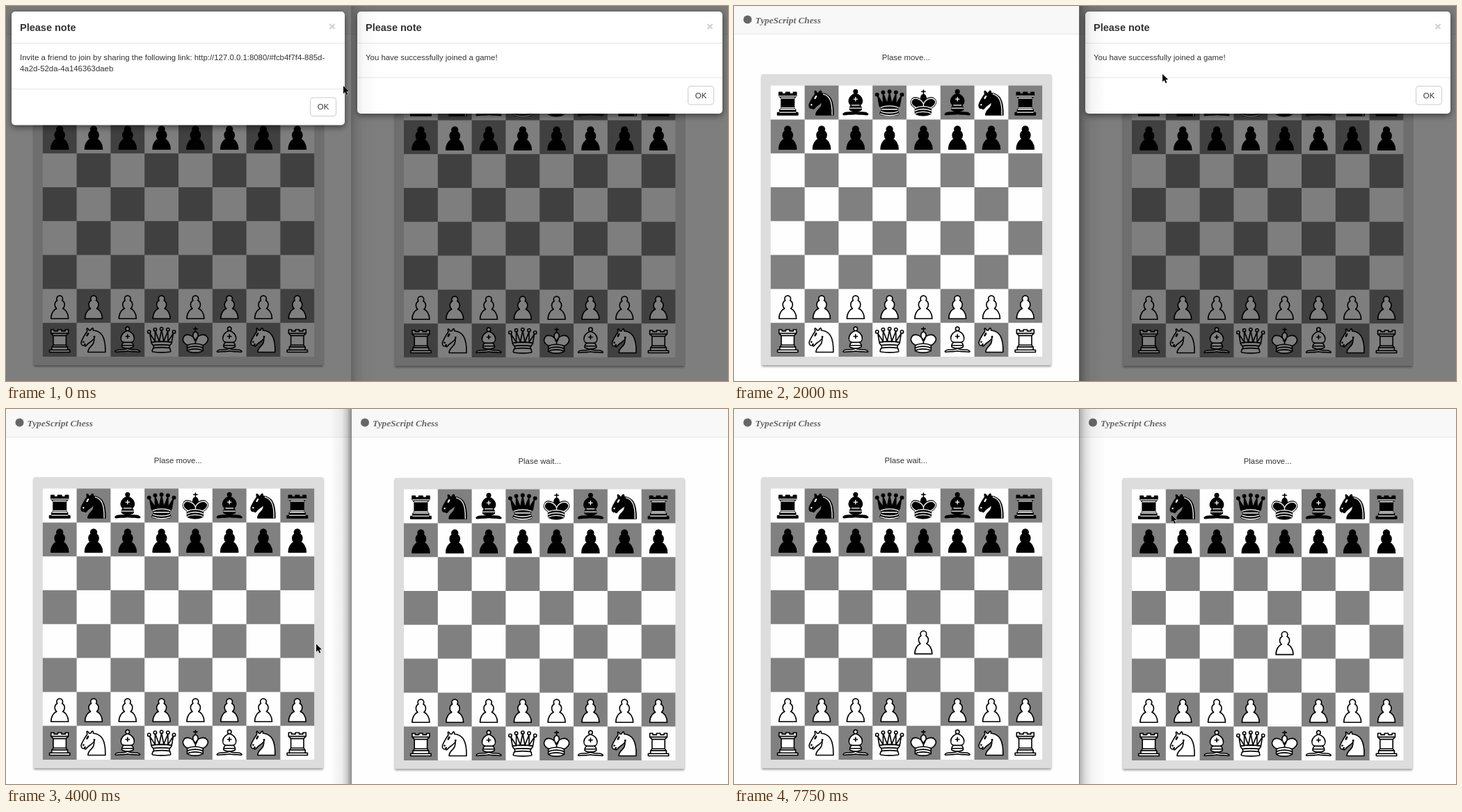
These frames come from a looping animation (1038x540 px, 8 s). An HTML page:

```html
<!DOCTYPE html>
<html lang="en">
<head>
<meta charset="utf-8">
<title>Chess</title>
<style>
html, body { margin: 0; width: 100%; height: 100%; overflow: hidden; background: #fefefe; }
svg { display: block; width: 1038px; height: 540px; font: 11.4px "Liberation Sans", Arial, sans-serif; }
text { fill: #333; }
.title { font-size: 14.5px; font-weight: bold; }
.brand { font: italic bold 13.3px "Liberation Serif", serif; fill: #666; }
.close { font-size: 17px; font-weight: bold; fill: #ccc; }
.piece { stroke-width: 1.5; stroke-linecap: round; stroke-linejoin: round; }
.frame { filter: drop-shadow(0 2px 1.5px rgba(0, 0, 0, .4)); }
.modal { filter: drop-shadow(0 3px 5px rgba(0, 0, 0, .5)); }
</style>
</head>
<body>
<svg id="stage" viewBox="0 0 1038 540"></svg>
<script>
const CELL = 48.8, STEP = 250, STEPS = 32;
const stage = document.getElementById('stage');
const get = id => document.getElementById(id);

const dots = [[6, 12], [14, 9], [22.5, 8], [31, 9], [39, 12]]
  .map(([x, y]) => `M${x - 2} ${y}a2 2 0 1 1 4 0 2 2 0 1 1-4 0z`).join('');
const kingBands = 'M11.5 30c5.5-3 15.5-3 21 0m-21 3.5c5.5-3 15.5-3 21 0m-21 3.5c5.5-3 15.5-3 21 0';
const mitre = 'M17.5 26h10M15 30h15m-7.5-14.5v5M20 18h5';
const eyes = 'M9.5 25.5a.5.5 0 1 1-1 0 .5.5 0 1 1 1 0zM14.9 15.8a.5 1.5 30 1 1-.8-.5.5 1.5 30 1 1 .8.5z';

// body, details on white pieces, details on black pieces
const pieces = {
  p: ['M22.5 9c-2.21 0-4 1.79-4 4 0 .89.29 1.71.78 2.38C17.33 16.5 16 18.59 16 21c0 2.03.94 3.84 2.41 5.03-3 1.06-7.41 5.55-7.41 13.47h23c0-7.92-4.41-12.41-7.41-13.47 1.47-1.19 2.41-3 2.41-5.03 0-2.41-1.33-4.5-3.28-5.62.49-.67.78-1.49.78-2.38 0-2.21-1.79-4-4-4z', '', ''],
  r: ['M9 39h27v-3H9zM12 36v-4h21v4zM11 14V9h4v2h5V9h5v2h5V9h4v5zM34 14l-3 3H14l-3-3M31 17v12.5H14V17M31 29.5l1.5 2.5h-20l1.5-2.5z', '',
    'M12 35.5h21M13 31.5h19M14 29.5h17M14 16.5h17M11 14h23'],
  n: ['M22 10c10.5 1 16.5 8 16 29H15c0-9 10-6.5 8-21M24 18c.38 2.91-5.55 7.37-8 9-3 2-2.82 4.34-5 4-1.04-.94 1.41-3.04 0-3-1 0 .19 1.23-1 2-1 0-4 1-4-4 0-2 6-12 6-12s1.89-1.9 2-3.5c-.73-1-.5-2-.5-3 1-1 3 2.5 3 2.5h2s.78-2 2.5-3c1 0 1 3 1 3',
    eyes, eyes + 'M24.6 11.3c8 1.8 12.2 9 11.8 27.6'],
  b: ['M9 36c3.39-.97 10.11.43 13.5-2 3.39 2.43 10.11 1.03 13.5 2 0 0 1.65.54 3 2-.68.97-1.65.99-3 .5-3.39-.97-10.11.46-13.5-1-3.39 1.46-10.11.03-13.5 1-1.35.49-2.32.47-3-.5 1.35-1.94 3-2 3-2zM15 32c2.5 2.5 12.5 2.5 15 0 .5-1.5 0-2 0-2 0-2.5-2.5-4-2.5-4 5.5-1.5 6-11.5-5-15.5-11 4-10.5 14-5 15.5 0 0-2.5 1.5-2.5 4 0 0-.5.5 0 2zM25 8a2.5 2.5 0 1 1-5 0 2.5 2.5 0 1 1 5 0z', mitre, mitre],
  q: [dots + 'M9 26c8.5-1.5 21-1.5 27 0l2-12-7 11V11l-5.5 13.5-3-15-3 15-5.5-14V25L7 14zM9 26c0 2 1.5 2 2.5 4 1 1.5 1 1 .5 3.5-1.5 1-1.5 2.5-1.5 2.5-1.5 1.5.5 2.5.5 2.5 6.5 1 16.5 1 23 0 0 0 1.5-1 0-2.5 0 0 .5-1.5-1-2.5-.5-2.5-.5-2 .5-3.5 1-2 2.5-2 2.5-4-8.5-1.5-18.5-1.5-27 0z',
    'M11.5 30c3.5-1 18.5-1 22 0M12 33.5c6-1 15-1 21 0',
    'M11 29a35 35 0 0 1 23 0M12.5 31.5h20M11.5 34.5a35 35 0 0 0 22 0M10.5 37.5a35 35 0 0 0 24 0'],
  k: ['M22.5 11.63V6M20 8h5M22.5 25s4.5-7.5 3-10.5c0 0-1-2.5-3-2.5s-3 2.5-3 2.5c-1.5 3 3 10.5 3 10.5M11.5 37c5.5 3.5 15.5 3.5 21 0v-7s9-4.5 6-10.5c-4-6.5-13.5-3.5-16 4V27v-3.5c-3.5-7.5-13-10.5-16-4-3 6 5 10 5 10z', kingBands,
    kingBands + 'M32 29.5s8.5-4 6-9.65C34.15 14 25 18 22.5 24.5v2.1-2.1C20 18 9.9 14 7 19.85c-2.5 5.65 4.85 9 4.85 9']
};

const rect = (x, y, w, h, more) => `<rect x="${x}" y="${y}" width="${w}" height="${h}" ${more}/>`;
const text = (x, y, str, more = '') => `<text x="${x}" y="${y}" ${more}>${str}</text>`;

function piece(kind, black, x, y, id) {
  const [body, light, dark] = pieces[kind];
  return `<g ${id ? `id="${id}"` : ''} class="piece" transform="translate(${x} ${y}) scale(${CELL / 45})">
    <path d="${body}" fill="${black ? '#000' : '#fff'}" stroke="#000"/>
    <path d="${black ? dark : light}" fill="none" stroke="${black ? '#fff' : '#000'}" ${black ? 'stroke-width="1.2"' : ''}/></g>`;
}

function board(side, x, y) {
  let out = rect(x - 12.8, y - 16.4, 416, 419, 'fill="#ddd" rx="1" class="frame"') +
    rect(x, y, CELL * 8, CELL * 8, 'fill="#fefefe"');
  let squares = '';
  for (let i = 0; i < 64; i++) {
    const col = i % 8, row = i >> 3;
    if ((col + row) % 2) squares += `M${x + col * CELL} ${y + row * CELL}h${CELL}v${CELL}h${-CELL}z`;
  }
  out += `<path d="${squares}" fill="#808080"/>`;
  if (side === 'left') {
    const glow = (row, hue) => rect(x + 4 * CELL, y + row * CELL, CELL, CELL, `fill="url(#${hue})"`);
    out += `<g id="glow">${glow(4, 'blue')}${glow(5, 'blue')}${glow(6, 'orange')}</g>`;
  }
  [...'rnbqkbnr'].forEach((kind, col) => {
    const px = x + col * CELL;
    out += piece(kind, true, px, y) + piece('p', true, px, y + CELL) +
      piece('p', false, px, y + 6 * CELL, col === 4 && side + 'Pawn') + piece(kind, false, px, y + 7 * CELL);
  });
  return out;
}

function pane(side, x, w, boardX, boardY, middle) {
  return rect(x, 0, w, 540, 'fill="#fefefe"') + rect(x, 0, w, 40, 'fill="#f8f8f8"') +
    rect(x, 40, w, 1, 'fill="#e7e7e7"') +
    `<circle cx="${x + 19.5}" cy="19.5" r="6" fill="#666"/>` +
    text(x + 30.5, 24.5, 'TypeScript Chess', 'class="brand"') +
    text(middle, boardY - 36.6, '', `id="${side}Status" text-anchor="middle"`) +
    board(side, boardX, boardY) +
    rect(x, 0, w, 540, `id="${side}Dim" opacity=".5"`);
}

function modal(side, x, w, h, lines) {
  const right = x + w, foot = 8 + h - 52.5, top = 8 + h - 40;
  return `<g id="${side}Modal">` + rect(x, 8, w, h, 'rx="5" fill="#fff" class="modal"') +
    rect(x, 53, w, 1, 'fill="#e5e5e5"') + rect(x, foot, w, 1, 'fill="#e5e5e5"') +
    text(x + 12, 35.5, 'Please note', 'class="title"') + text(right - 23, 34.5, '×', 'class="close"') +
    lines.map((line, i) => text(x + 12, 78 + i * 16.3, line)).join('') +
    rect(right - 51.5, top - 1.5, 41, 30, `id="${side}Ring" rx="5" fill="none" stroke="#66afe9" stroke-width="3" opacity=".8"`) +
    rect(right - 49.5, top + .5, 37, 26.5, `id="${side}Button" rx="3.5"`) +
    text(right - 31, top + 17.8, 'OK', 'text-anchor="middle"') + '</g>';
}

const radial = (id, color, edge) => `<radialGradient id="${id}" r=".7">
  <stop offset=".1" stop-color="${color}" stop-opacity="0"/>
  <stop offset=".7" stop-color="${color}" stop-opacity="${edge}"/>
  <stop offset="1" stop-color="${color}" stop-opacity="${edge + .1}"/></radialGradient>`;
const fade = (id, x1, x2, dark) => `<linearGradient id="${id}" x1="${x1}" x2="${x2}">` +
  [[0, dark], [.2, dark * .45], [.45, dark * .14], [1, 0]]
    .map(([at, a]) => `<stop offset="${at}" stop-opacity="${a}"/>`).join('') + '</linearGradient>';

stage.innerHTML = '<defs>' + radial('blue', '#0a84ff', .55) + radial('orange', '#ff9800', .6) +
  fade('toRight', 0, 1, .3) + fade('toLeft', 1, 0, .42) + '</defs>' +
  pane('left', 0, 496, 52.8, 114.6, 247.3) + pane('right', 496.5, 542, 572, 115.6, 767.2) +
  modal('left', 8, 479, 163.5, ['Invite a friend to join by sharing the following link: http://127.0.0.1:8080/#fcb4f7f4-885d-', '4a2d-52da-4a146363daeb']) +
  modal('right', 505, 525, 147, ['You have successfully joined a game!']) +
  rect(497, 0, 38, 540, 'id="rightShade" fill="url(#toRight)"') +
  rect(466, 0, 30, 540, 'id="leftShade" fill="url(#toLeft)"') +
  rect(496, 0, 1, 540, 'fill="#000" opacity=".45"') +
  '<path id="cursor" d="M0 0v11.2l2.6-2.4 1.9 4.2 1.9-.8-1.9-4.1h3.6z" stroke="#fff" stroke-width="1" paint-order="stroke"/>';

// step, x, y
const route = [[0, 485, 115], [3, 453.5, 147], [6, 453.5, 147], [7, 480, 138], [8, 616, 98], [10, 895, 118],
  [12, 992, 132], [14, 994, 133], [15, 994, 133], [16, 446, 338.5], [18, 250, 414], [20, 250, 414],
  [22, 270.5, 419], [25, 270.5, 419], [27, 271, 340], [28, 271, 340], [29, 300, 318], [31, 628.5, 152], [32, 628.5, 152]];

function cursorAt(step) {
  const i = route.findIndex(([at]) => at > step);
  const [a, ax, ay] = route[i - 1], [b, bx, by] = route[i];
  const f = (step - a) / (b - a);
  return [ax + (bx - ax) * f, ay + (by - ay) * f];
}

const show = (id, opacity) => get(id).setAttribute('opacity', +opacity);
function paintButton(side, fill, border) {
  get(side + 'Button').setAttribute('fill', fill);
  get(side + 'Button').setAttribute('stroke', border);
}

function draw(now) {
  const step = Math.floor(now / STEP) % STEPS;
  const moved = step >= 28, leftActive = step < 12 || step >= 20;
  const pressed = step === 6, hover = step >= 13;

  show('leftModal', step < 7);
  show('leftDim', step < 8 ? .5 : 0);
  show('rightModal', step < 15);
  show('rightDim', step < 16 ? .5 : 0);
  show('leftRing', pressed ? .8 : 0);
  show('rightRing', 0);
  paintButton('left', pressed ? '#d4d4d4' : '#fff', pressed ? '#8c8c8c' : '#ccc');
  paintButton('right', hover ? '#e6e6e6' : '#fff', hover ? '#adadad' : '#ccc');

  show('rightShade', leftActive ? (step < 3 ? .6 : 1) : 0);
  show('leftShade', !leftActive);
  show('glow', moved ? 0 : Math.max(0, Math.min(1, (step - 20) / 4)));

  get('leftStatus').textContent = moved ? 'Plase wait...' : 'Plase move...';
  get('rightStatus').textContent = moved ? 'Plase move...' : 'Plase wait...';
  const row = moved ? 4 : 6, scale = CELL / 45;
  for (const [side, x, y] of [['left', 52.8, 114.6], ['right', 572, 115.6]])
    get(side + 'Pawn').setAttribute('transform', `translate(${x + 4 * CELL} ${y + row * CELL}) scale(${scale})`);
  get('cursor').setAttribute('transform', `translate(${cursorAt(step)})`);
  requestAnimationFrame(draw);
}
requestAnimationFrame(draw);
</script>
</body>
</html>
```
